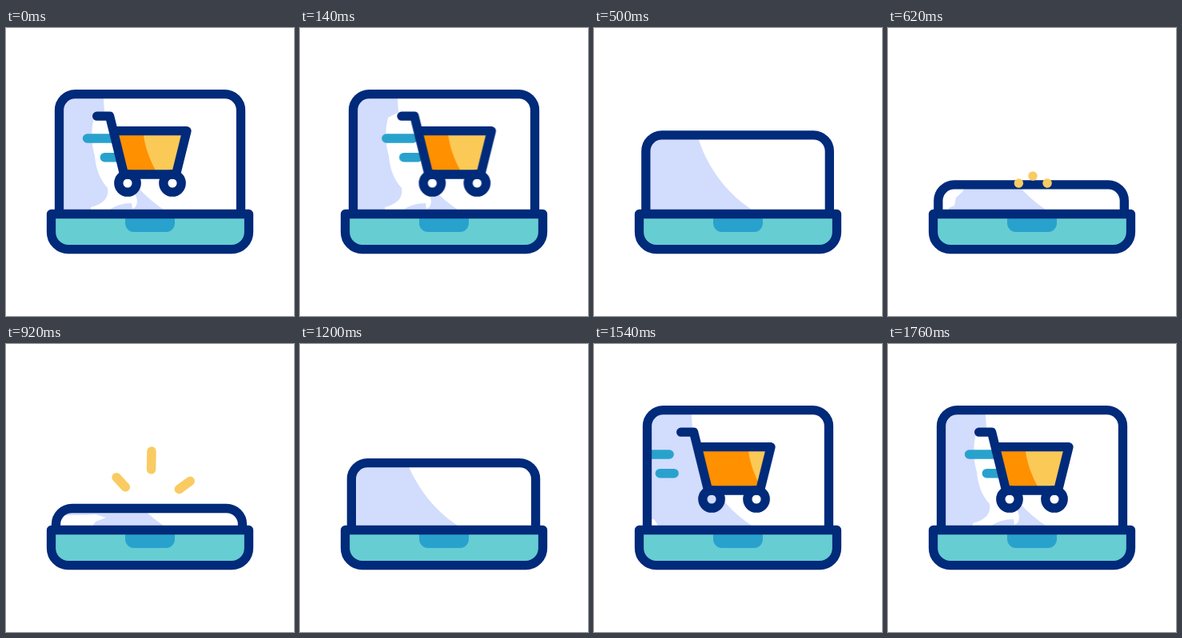
An HTML page without scripts that plays this animation: 360 by 360 pixels, repeating every 2040 ms.

```html
<!DOCTYPE html>
<html lang="en">
<head>
<meta charset="utf-8">
<title>Laptop cart</title>
<style>
  html, body { margin: 0; width: 100%; height: 100%; overflow: hidden; background: #fff; }
  svg { display: block; width: 100vw; height: 100vh; }

  .ink { fill: none; stroke: #002a7a; stroke-width: 11.3; stroke-linecap: round; stroke-linejoin: round; }
  .lilac { fill: #d2dcfc; }
  .gap { fill: #fff; }
  .speed { stroke: #28a2cd; stroke-width: 11.6; stroke-linecap: round; }
  .spark { stroke: #f9cb62; stroke-width: 11.5; stroke-linecap: round; fill: none; }

  .lid, .cart, .trail, .shine, .spark, .gap { animation: 2040ms linear infinite; }
  .lid { animation-name: lid; }
  .cart { animation-name: cart; }
  .trail { animation-name: trail; }
  .shine { animation-name: shine; }
  .spark { animation-name: spark; }
  .gap { animation-timing-function: step-end; }
  .rest { animation-name: rest; }
  .shut { animation-name: shut; }
  .held { animation-name: held; }
  .enter { animation-name: enter; }

  @keyframes lid {
    0%, 17.45% { x: 66.5px; y: 82.7px; width: 227px; height: 167.3px; animation-timing-function: cubic-bezier(.37,0,.63,1); }
    33.33% { x: 62.5px; y: 205.5px; width: 233px; height: 44.5px; }
    48.53% { x: 62.5px; y: 205.5px; width: 233px; height: 44.5px; animation-timing-function: cubic-bezier(.37,0,.63,1); }
    70.2%, 100% { x: 66.5px; y: 82.7px; width: 227px; height: 167.3px; }
  }
  @keyframes cart {
    0%, .5% { transform: none; animation-timing-function: cubic-bezier(.32,0,.67,0); }
    16.5% { transform: translateX(200px); animation-timing-function: step-end; }
    63.73% { transform: translateX(-190px); animation-timing-function: cubic-bezier(.33,1,.68,1); }
    80.39%, 100% { transform: none; }
  }
  @keyframes trail {
    0%, 1.96% { transform: none; animation-timing-function: cubic-bezier(.32,0,.67,0); }
    18.63% { transform: translateX(230px); animation-timing-function: step-end; }
    68.63% { transform: translateX(-180px); animation-timing-function: cubic-bezier(.33,1,.68,1); }
    86.27%, 100% { transform: none; }
  }
  @keyframes shine {
    0%, 20% { transform: none; animation-timing-function: step-end; }
    60%, 70% { transform: translateX(60px); animation-timing-function: ease-out; }
    84%, 100% { transform: none; }
  }
  @keyframes spark {
    0% { visibility: hidden; stroke-dasharray: .1 300; stroke-dashoffset: 0; animation-timing-function: step-end; }
    29.9% { visibility: visible; stroke-dasharray: .1 300; stroke-dashoffset: 0; }
    30.5% { visibility: visible; stroke-dasharray: .1 300; stroke-dashoffset: 0; }
    38% { visibility: visible; stroke-dasharray: 48 300; stroke-dashoffset: -14; }
    45.1% { visibility: visible; stroke-dasharray: 43 300; stroke-dashoffset: -53; }
    51.96% { visibility: visible; stroke-dasharray: .1 300; stroke-dashoffset: -99.8; animation-timing-function: step-end; }
    52.4%, 100% { visibility: hidden; stroke-dasharray: .1 300; stroke-dashoffset: 0; }
  }
  @keyframes rest { 0% { opacity: 1; } 8.8% { opacity: 0; } 76.4%, 100% { opacity: 1; } }
  @keyframes shut { 0% { opacity: 0; } 28.4% { opacity: 1; } 37.2%, 100% { opacity: 0; } }
  @keyframes held { 0% { opacity: 0; } 37.2% { opacity: 1; } 52.9%, 100% { opacity: 0; } }
  @keyframes enter { 0% { opacity: 0; } 65.6% { opacity: 1; } 76.4%, 100% { opacity: 0; } }
</style>
</head>
<body>
<svg viewBox="0 0 360 360">
  <defs>
    <clipPath id="screen"><rect class="lid" x="66.5" y="82.7" width="227" height="167.3" rx="20"/></clipPath>
    <clipPath id="basket"><path d="M135 128H226L212.5 183H148Z"/></clipPath>
  </defs>

  <g clip-path="url(#screen)">
    <path class="lilac" d="M60 70H122V88C123 145 152 197 197 227V240H60Z"/>
    <path class="gap rest" d="M126 104L110 112Q104 135 111 160Q113 185 127 200Q130 218 106 224V228H128Q140 219 157 219L158 226Q168 222 161 206L170 190 150 140Z"/>
    <path class="gap shut" d="M60 195H98L93 205 85 212 83 222 76 225V228H60Z"/>
    <path class="gap held" d="M60 214Q95 214 112 213L125 217 112 222 108 228H60Z"/>
    <path class="gap enter" d="M66 219H75L81 228H66Z"/>

    <g class="trail speed">
      <path d="M101.6 138H135M123.4 161.7H141"/>
    </g>
    <g class="cart">
      <g clip-path="url(#basket)">
        <path fill="#ff9000" d="M130 125H230V185H130Z"/>
        <path class="shine" fill="#fbc956" d="M171 125L172 134C174 150 180 165 187 178V185H260V125Z"/>
      </g>
      <path class="ink" d="M113.6 110.2H129.6L147.6 183H212.5L226 128.7H135"/>
      <g class="ink">
        <circle cx="152" cy="194" r="11.2"/>
        <circle cx="208" cy="194" r="11.2"/>
      </g>
    </g>
  </g>

  <rect class="lid ink" x="66.5" y="82.7" width="227" height="167.3" rx="20"/>

  <path fill="#66cdd2" d="M56.5 232.5H303.5V255A21.5 21.5 0 0 1 282 276.7H78A21.5 21.5 0 0 1 56.5 255Z"/>
  <path fill="#28a2cd" d="M149 236H211V244A11 11 0 0 1 200 255H160A11 11 0 0 1 149 244Z"/>
  <path class="ink" d="M56.5 232.5H303.5V255A21.5 21.5 0 0 1 282 276.7H78A21.5 21.5 0 0 1 56.5 255Z"/>

  <path class="spark" pathLength="100" d="M181 185L182 132"/>
  <path class="spark" pathLength="100" d="M163.4 194L137 165.5"/>
  <path class="spark" pathLength="100" d="M199 194L231.5 170.5"/>
</svg>
</body>
</html>
```
